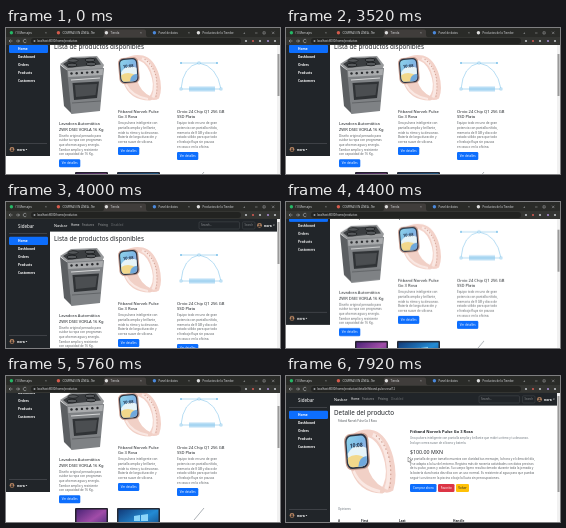
Animation, 274 px wide and 146 px high, one loop 8000 ms. Source, as an HTML page:

```html
<!DOCTYPE html>
<html lang="es">
<head>
<meta charset="utf-8">
<title>Tienda</title>
<style>
html, body { margin: 0; width: 100%; height: 100%; overflow: hidden; background: #fff; }
svg { display: block; width: 100%; height: 100%; font-family: "Noto Sans", sans-serif; }
.scroll { animation: scroll 8s infinite; }
.thumb { animation: thumb 8s infinite; }
.list { animation: list 8s step-end infinite; }
.detail { animation: detail 8s step-end infinite; }
.hover { animation: hover 8s step-end infinite; }
.pointer { animation: pointer 8s infinite; }
@keyframes scroll {
  0%, 47% { transform: translateY(-18px); animation-timing-function: ease-out; }
  49.5%, 51% { transform: translateY(0); animation-timing-function: ease-in-out; }
  57%, 100% { transform: translateY(-30px); }
}
@keyframes thumb {
  0%, 47% { transform: translateY(6px); animation-timing-function: ease-out; }
  49.5%, 51% { transform: translateY(0); animation-timing-function: ease-in-out; }
  57%, 100% { transform: translateY(10px); }
}
@keyframes list { 0% { visibility: visible; } 80% { visibility: hidden; } }
@keyframes detail { 0% { visibility: hidden; } 80% { visibility: visible; } }
@keyframes hover { 0% { fill: #0d6efd; } 74% { fill: #0b5ed7; } }
@keyframes pointer {
  0%, 91% { transform: translate(126px, 111px); animation-timing-function: ease-in-out; }
  98%, 100% { transform: translate(122px, 81px); }
}
</style>
</head>
<body>
<svg id="stage" viewBox="0 0 274 146"></svg>
<script>
const INK = '#212529', BLUE = '#0d6efd', GRAY = '#6c757d', BODY = '#5c6064';

const text = (x, y, str, size, fill = INK, extra = '') =>
  `<text x="${x}" y="${y}" font-size="${size}" fill="${fill}" ${extra}>${str}</text>`;
const rect = (x, y, w, h, fill, extra = '') =>
  `<rect x="${x}" y="${y}" width="${w}" height="${h}" fill="${fill}" ${extra}/>`;
const circle = (x, y, r, fill) => `<circle cx="${x}" cy="${y}" r="${r}" fill="${fill}"/>`;
const path = (d, fill = 'none', extra = '') => `<path d="${d}" fill="${fill}" ${extra}/>`;
const lines = (x, y, pitch, rows, size, fill) =>
  rows.map((row, i) => text(x, y + i * pitch, row, size, fill)).join('');
const button = (x, y, w, label, fill = BLUE, ink = '#fff', extra = '') =>
  rect(x, y, w, 8, fill, `rx="1.3" ${extra}`) +
  text(x + w / 2, y + 5, label, 2.9, ink, 'text-anchor="middle"');

const avatar = (x, y) => circle(x, y, 2.4, '#b58461') + circle(x, y - .6, .9, '#3d3430') +
  path(`M${x - 1.6} ${y + 1.7}a1.6 1.6 0 0 1 3.2 0z`, '#3d3430');
const caret = (x, y) => path(`M${x} ${y}h1.8l-.9 1z`, '#fff');

function sidebar() {
  const rule = y => rect(3, y, 38, .4, '#6b6e71');
  const items = ['Dashboard', 'Orders', 'Products', 'Customers'];
  return rect(0, 17, 44, 129, INK) + text(12, 25.6, 'Sidebar', 4.5, '#fff') + rule(31) +
    rect(3, 34.8, 39, 8.3, BLUE, 'rx="1.3"') + text(12, 40.2, 'Home', 3.3, '#fff', 'font-weight="600"') +
    items.map((s, i) => text(12, 48.4 + i * 8, s, 3.2, '#fff', 'font-weight="600"')).join('') +
    rule(133) + avatar(6, 139.5) + text(11, 140.6, 'nora', 3.4, '#fff', 'font-weight="700"') + caret(19.5, 138.9);
}

function navbar() {
  const links = [[65, 'Home', '#fff'], [76, 'Features', '#9b9d9f'], [92, 'Pricing', '#9b9d9f'], [105, 'Disabled', '#6a6d70']];
  return rect(44, 17, 227, 12.6, INK) + text(48, 24.6, 'Navbar', 3.9, '#fff', 'font-weight="500"') +
    links.map(([x, s, c]) => text(x, 24.4, s, 3, c)).join('') +
    rect(193, 19.8, 40.5, 7.2, INK, 'rx="1.2" stroke="#5b5f63" stroke-width=".35"') +
    text(195, 24.4, 'Search...', 2.8, '#8f9295') +
    rect(236.5, 19.8, 12.5, 7.2, 'none', 'rx="1.2" stroke="#555a5e" stroke-width=".35"') +
    text(242.8, 24.4, 'Search', 2.7, '#85898c', 'text-anchor="middle"') +
    avatar(253.5, 23.3) + text(258, 24.5, 'nora', 3.3, '#fff', 'font-weight="700"') + caret(267, 22.7);
}

function stove() {
  const burner = (x, y) => `<ellipse cx="${x}" cy="${y}" rx="5" ry="1.8" fill="#55585b" stroke="#191b1d" stroke-width=".8"/>`;
  const knobs = [0, 1, 2, 3, 4, 5].map(i => circle(65.5 + i * 5.2, 63.5 - i * .3, 1.2, '#2b2d30')).join('');
  return path('M54 55L62 61L66 104L58 96Z', '#5c5f62') +
    path('M54 54L65 47L91 46L98 55L96 60L62 61Z', '#97999b') +
    path('M57 54L66 48.5L90 47.5L95 54.5L62 58Z', '#3b3e41') +
    burner(67, 50.5) + burner(84, 50) + burner(66, 55) + burner(85, 54) +
    path('M61 60L98 58L94 101L65.5 104Z', '#7f8285') +
    path('M62 61L97 59L96.5 65L62.4 67Z', '#a9abad') + knobs +
    path('M65 70L94 68', 'none', 'stroke="#d5d6d7" stroke-width="1.1"') +
    path('M66.5 73L93 71.5L91 88L68 90Z', '#303336') +
    path('M69 75L91 74L89.5 85L70 87Z', '#4b4e51') +
    path('M66 93L94.5 91', 'none', 'stroke="#55585b" stroke-width=".7"');
}

// Drawn in a 44 by 46 box.
function watch() {
  const hole = 'stroke="#cfa093" stroke-width="1.1" stroke-linecap="round" stroke-dasharray=".1 3"';
  return path('M7 4Q15 -1 25 1Q36 4 41 20Q45 34 41 44Q36 47 30 44Q37 36 34 24Q30 9 21 6Z', '#f3d2c9') +
    path('M24 4Q33 8 36 21Q39 34 35 43', 'none', 'stroke="#fae8e3" stroke-width="3"') +
    path('M27 5Q35 11 38 22Q40 32 38 42', 'none', hole) +
    path('M5 27L19 25Q22 37 33 42Q36 45 32 46Q11 46 5 27Z', '#f1d0c6') +
    path('M8 30Q14 42 30 44.5', 'none', 'stroke="#fae8e3" stroke-width="2"') +
    `<g transform="rotate(-5 11 16)">` +
    rect(.7, 3, 20.3, 26, '#c99f91', 'rx="5.2"') + rect(1.6, 3.8, 18.3, 24.4, '#2c3442', 'rx="4.7"') +
    rect(2.7, 5, 16, 22, 'url(#dial)', 'rx="4"') +
    path('M3 17Q9 9 18.7 14V22Q12 25 3 21Z', '#e7f4f8') +
    path('M2.8 20Q10 16 18.6 22Q18 27 14 27H7Q3 27 2.8 23Z', '#f2d88b') +
    path('M11 27Q12 20 18.6 20V23Q18 27 14 27Z', '#6fa8dc') +
    text(10.6, 13, '10:08', 4.2, '#24344d', 'text-anchor="middle" font-weight="600"') + '</g>';
}

function sketch() {
  const pen = 'stroke="#7bc0ea" stroke-width=".55"';
  const anchor = (x, y) => rect(x - 1, y - 1, 2, 2, '#fff', pen);
  return rect(183, 76.5, 26, 5, '#b9def5') + path('M175 79H216M175 53H211', 'none', pen) +
    path('M175 79Q177 56 193 53Q211 56 215 79', 'none', pen) +
    circle(175, 53, 1, '#7bc0ea') + circle(211, 53, 1, '#7bc0ea') +
    anchor(193, 53) + anchor(175, 79) + anchor(215, 79);
}

function card(x, y, title, body, buttonY, extra) {
  return title.map((s, i) => text(x, y + i * 5.4, s, 4.1, INK, 'font-weight="500"')).join('') +
    lines(x, y + 11.3, 4.65, body, 3.05, BODY) +
    button(x, buttonY, 21.3, 'Ver detalles', BLUE, '#fff', extra);
}

function laptops() {
  return rect(69, 162, 33, 24, '#25212e', 'rx="1"') + rect(70.5, 163.5, 30, 21, 'url(#violet)') +
    rect(111, 162, 43, 28, '#252a36', 'rx="1"') + rect(112.5, 163.5, 40, 25, 'url(#azure)') +
    path('M128 170l6-1v6h-6zM135 169l7-1v7h-7z', '#8bd5fa') +
    path('M188 174L198 162', 'none', 'stroke="#abb0b5" stroke-width="1"');
}

function listPage() {
  return rect(44, 17, 230, 129, '#fff') + `<g class="scroll">` + sidebar() + navbar() +
    text(48, 38.8, 'Lista de productos disponibles', 6.3) +
    stove() + `<g transform="translate(112 44.5)">${watch()}</g>` + sketch() +
    card(53, 115.4, ['Lavadora Automática', 'ZWR DSEI VORLA 16 Kg'], [
      'Diseño original pensado para',
      'cuidar tu ropa con programas',
      'que ahorran agua y energía.',
      'Tambor amplio y resistente',
      'con capacidad de 16 Kg.'], 149.2) +
    card(112, 103, ['Fitband Norvek Pulse', 'Go 3 Rosa'], [
      'Una pulsera inteligente con',
      'pantalla amplia y brillante,',
      'mide tu ritmo y tu descanso.',
      'Batería de larga duración y',
      'correa suave de silicona.'], 137, 'class="hover"') +
    card(171, 103, ['Orvio 24 Chip Q1 256 GB', 'SSD Plata'], [
      'Equipo todo en uno de gran',
      'potencia con pantalla nítida,',
      'memoria de 8 GB y disco de',
      'estado sólido para que todo',
      'el trabajo fluya sin pausas',
      'en casa o en la oficina.'], 142) +
    laptops() + '</g>' + scrollbar(42, 'class="thumb"');
}

function detailPage() {
  const name = 'Fitband Norvek Pulse Go 3 Rosa';
  const heads = [[52, '#'], [75, 'First'], [113, 'Last'], [167, 'Handle']];
  return rect(44, 17, 230, 129, '#fff') + sidebar() + navbar() +
    text(48, 38.5, 'Detalle del producto', 6.3) + text(52, 46.1, name, 2.6, '#50565b') +
    `<g transform="translate(58 53) scale(1.2 1.4)">${watch()}</g>` +
    text(124, 57.2, name, 4, INK, 'font-weight="600"') +
    lines(124, 63.2, 4.5, [
      'Una pulsera inteligente con pantalla amplia y brillante que mide tu ritmo y tu descanso.',
      'Incluye correa suave de silicona y batería.'], 2.9, GRAY) +
    text(124, 77.8, '$100.00 MXN', 5.3, INK, 'font-weight="500"') +
    lines(124, 84.2, 4.6, [
      'La pantalla de gran tamaño muestra con claridad tus mensajes, la hora y el clima del día,',
      'y se adapta a la luz del entorno. Registra más de noventa actividades con datos precisos',
      'de tu pulso, pasos y calorías. Su cuerpo ligero resulta cómodo durante toda la jornada y',
      'la batería dura hasta diez días con un uso normal. Es resistente al agua para que puedas',
      'seguir tu rutina en la piscina o bajo la lluvia sin preocupaciones.'], 3, BODY) +
    button(124, 108, 26.5, 'Comprar ahora') + button(152, 108, 16.5, 'Favorito', '#dc3545') +
    button(170, 108, 13, 'Volver', '#ffc107', INK) +
    text(52, 134, 'Opiniones', 2.7, GRAY) +
    heads.map(([x, s]) => text(x, 146.2, s, 3.2, INK, 'font-weight="700"')).join('') +
    scrollbar(96) +
    `<g class="pointer">${path('M0 0v5l1.2-1l.9 2l.9-.4l-.9-1.9h1.6z', '#fff', 'stroke="#222" stroke-width=".35"')}</g>`;
}

function scrollbar(height, extra = '') {
  return rect(271, 17, 3, 129, '#f1f1f1') + rect(271.5, 20, 2, height, '#9a9a9a', extra);
}

function chrome() {
  const tabs = [[3, '(1) Mensajes', '#25b866'], [50, 'COMPRAS EN LÍNEA - Tie', '#d45b4c'], [98, 'Tienda', '#dedede'],
    [146, 'Panel de datos', '#4b89dc'], [190, 'Productos de la Tienda', '#dedede']];
  const dot = (x, c) => circle(x, 13, 1.1, c);
  return rect(0, 0, 274, 9.5, '#2a2b28') + rect(0, 9, 274, 8, '#343532') +
    path('M96 9.2Q98 9 98 7V3Q98 1.5 100 1.5H138Q140 1.5 140 3V7Q140 9 142 9.2Z', '#403d3b') +
    tabs.map(([x, s, c]) => circle(x + 2.4, 4.7, 1.7, c) + text(x + 6.5, 5.7, s, 2.8, '#d5d7da') +
      text(x + 36, 5.7, '×', 3.2, '#b5b8bb')).join('') +
    text(237, 6, '+', 4, '#c9cbce') +
    path('M249 5h2.5M257 3.8h2.2v2.2h-2.2zM266 3.7l2.4 2.4m0-2.4l-2.4 2.4', 'none', 'stroke="#c9cbce" stroke-width=".4"') +
    path('M6.5 13H3m1.5-1.5L3 13l1.5 1.5M10 13h3.5m-1.5-1.5l1.5 1.5l-1.5 1.5M20.3 12a1.7 1.7 0 1 0 0 2', 'none', 'stroke="#c9cbce" stroke-width=".5"') +
    rect(25, 10, 210, 6, '#222321', 'rx="3"') + circle(28.5, 13, 1, '#9b9ea2') +
    dot(240, '#bfc2c5') + dot(247, '#cf5951') + dot(254, '#bfc2c5') + dot(262, '#a58bce') + dot(269, '#bfc2c5');
}

const gradient = (id, ...colors) => `<linearGradient id="${id}" x2="1" y2="1">` +
  colors.map((c, i) => `<stop offset="${i / (colors.length - 1)}" stop-color="${c}"/>`).join('') + '</linearGradient>';
const address = 'localhost:8000/home/productos';

document.getElementById('stage').innerHTML =
  `<defs>${gradient('dial', '#8ed4ea', '#7eb7e6', '#b9a6dd')}${gradient('violet', '#4a2576', '#a14ca8', '#392a72')}${gradient('azure', '#123b79', '#238bd4', '#103468')}</defs>` +
  `<g class="list">${listPage()}</g><g class="detail">${detailPage()}</g>` + chrome() +
  `<g class="list">${text(31, 14, address, 2.7, '#dfe1e4')}</g>` +
  `<g class="detail">${text(31, 14, address + '/detalle/fitband-pulse-rosa/12', 2.7, '#dfe1e4')}</g>`;
</script>
</body>
</html>
```
